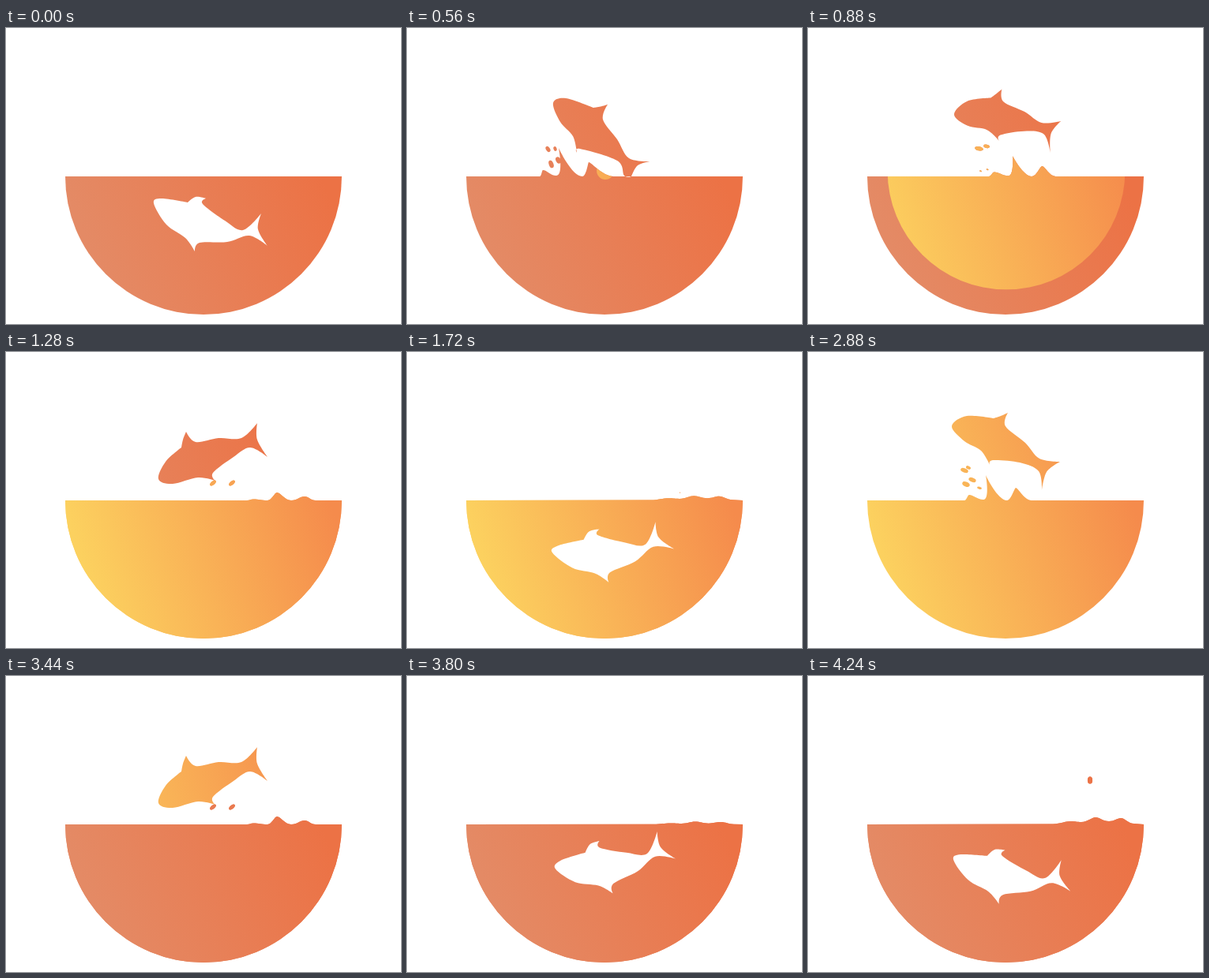
These frames come from a looping animation (500x375 px, 4280 ms). An HTML page:

```html
<!DOCTYPE html>
<html lang="en">
<head>
<meta charset="utf-8">
<title>Leaping fish</title>
<style>
  html, body { margin: 0; width: 100%; height: 100%; overflow: hidden; background: #fff; }
  svg { display: block; width: 100%; height: 100%; }
</style>
</head>
<body>
<svg viewBox="0 0 500 375">
  <defs>
    <linearGradient id="coral" gradientUnits="userSpaceOnUse" x1="120" y1="310" x2="400" y2="190">
      <stop offset="0" stop-color="#e48a65"/><stop offset="1" stop-color="#ec7245"/>
    </linearGradient>
    <linearGradient id="amber" gradientUnits="userSpaceOnUse" x1="104" y1="290" x2="410" y2="190">
      <stop offset="0" stop-color="#fcd15f"/><stop offset="1" stop-color="#f58b4c"/>
    </linearGradient>
    <clipPath id="air"><rect width="500" height="188"/></clipPath>
    <clipPath id="deep"><rect y="188" width="500" height="187"/></clipPath>
    <clipPath id="spread"><circle id="spot" cx="251" cy="181" r="0"/></clipPath>
  </defs>
  <path id="water"/>
  <path id="tint" clip-path="url(#spread)"/>
  <path id="flying" clip-path="url(#air)"/>
  <path id="diving" clip-path="url(#deep)" fill="#fff"/>
</svg>
<script>
const LOOP = 4280, HALF = 2160, STEP = 40, LEVEL = 188;
const el = id => document.getElementById(id);
const mapXY = (pts, fn) => pts.flatMap((v, i) => i % 2 ? [] : fn(v, pts[i + 1]));
const pairs = pts => mapXY(pts, (x, y) => [[x, y]]);
const clamp01 = v => Math.min(1, Math.max(0, v));

// Fish outlines: nose, back, dorsal fin, tail, belly, pectoral fin, chin.
const swim = [187, 222, 197, 216, 230, 221, 240, 214, 253, 216, 249, 223,
  277, 244, 300, 256, 323, 235, 319, 255, 331, 276, 308, 263,
  280, 271, 245, 272, 239, 283, 227, 266, 203, 249];
const leap = [185, 95, 201, 89, 236, 101, 245, 99.5, 254, 97, 248, 116,
  266, 141, 281, 165, 308, 169, 292, 174, 284, 188, 275, 187,
  266, 168, 219, 153, 215, 158, 210, 137, 194, 119];
const soar = [182, 94, 201, 81, 235, 84, 244, 81, 253, 77, 250, 94,
  275, 115, 293, 135, 319, 139, 302, 152, 296, 175, 292, 151,
  268, 140, 234, 137, 230, 143, 219, 125, 198, 113];
const plunge = [193, 161, 202, 139, 222, 121, 224, 111, 228, 101, 240, 114,
  269, 109, 298, 109, 318, 90, 318, 111, 331, 133, 309, 121,
  288, 133, 262, 153, 265, 163, 243, 159, 211, 167];
const CORNERS = new Set([2, 4, 8, 10, 14]);

function turned(deg, dx = 0, dy = 0) {
  const c = Math.cos(deg * Math.PI / 180), s = Math.sin(deg * Math.PI / 180);
  return mapXY(swim, (x, y) => {
    const u = x - 300, v = y - 257;
    return [300 + dx + u * c - v * s, 257 + dy + u * s + v * c];
  });
}

const fishTrack = [
  [-80, turned(-5.5)], [0, swim], [80, turned(4.5)],
  [560, leap], [720, soar], [1280, plunge],
  [1680, turned(-24, 4, -20)], [1860, turned(-14, -9, -4)],
  [2080, turned(-5.5)], [2160, swim], [2240, turned(4.5)]
];

// Surface outlines: feet and peaks in turn.
const burst = [168, 188, 172, 180, 189, 187, 192, 152, 222, 188, 230, 170, 262, 188];
const crest = [198, 188, 204, 181, 222, 187, 225, 156, 252, 188, 263, 172, 283, 188];
const ripple = [305, 188, 313, 186.5, 331, 188, 343, 178, 361, 188, 378, 183, 392, 188];
const swell = [310, 187.4, 333, 184, 346, 185, 364, 179, 381, 184, 396, 180, 413, 187];
const scaled = (pts, k, dx = 0) =>
  mapXY(pts, (x, y) => [x + dx, LEVEL + (y - LEVEL) * k]);

const waveTrack = [
  [0, scaled(burst, 0)], [240, scaled(burst, 0)],
  [560, burst], [720, crest], [1280, ripple],
  [1480, scaled(ripple, .6, 30)], [1660, scaled(swell, .4)],
  [1860, scaled(swell, 1.3)], [2080, swell], [2160, scaled(swell, 0)]
];

// A drop is x, y, rx, ry, tilt; it grows from the surface and sinks back.
const gone = (x, tilt) => [x, 187, 0, 0, tilt];
function spray(a, b, landing) {
  const end = landing
    ? [[1280, [landing, 166, 4.5, 2.4, -40]], [1400, gone(landing + 12, -45)]]
    : [[940, gone(b[0] + 26, 20)]];
  return [[400, gone(a[0] + 8, a[4])], [560, a], [720, b], ...end];
}
const dropTracks = [
  spray([178.5, 153.5, 2.4, 4, -35], [198, 150, 5, 2.7, 20], 262),
  spray([187.5, 153, 2, 3, -20], [203, 146.5, 3.2, 2, 25], 286),
  spray([182.5, 172.5, 2.9, 5, -20], [208, 162, 4.8, 2.7, 20]),
  spray([191.5, 167.5, 3.1, 4.4, -25], [200, 167.5, 5, 2.9, 25]),
  [[580, gone(202, 10)], [720, [217, 172.3, 3, 1.6, 15]], [880, gone(232, 20)]],
  [[1700, gone(345, 0)], [1880, [351, 112, 3, 4.5, 0]],
   [2080, [357, 132, 3.1, 4.6, 0]], [2150, gone(359, 0)]]
];

// Smooth interpolation through unevenly spaced keys.
function sample(track, t) {
  const last = track.length - 1;
  if (t <= track[0][0]) return track[0][1];
  if (t >= track[last][0]) return track[last][1];
  const i = track.findIndex(k => k[0] > t) - 1;
  const [t0, a] = track[i], [t1, b] = track[i + 1];
  const [tp, p] = track[Math.max(0, i - 1)], [tn, n] = track[Math.min(last, i + 2)];
  const d = t1 - t0, u = (t - t0) / d, w = 1 - u;
  return a.map((v, j) => {
    const m0 = (b[j] - p[j]) / (t1 - tp) * d, m1 = (n[j] - v) / (tn - t0) * d;
    return (1 + 2 * u) * w * w * v + u * w * w * m0
         + u * u * (3 - 2 * u) * b[j] - u * u * w * m1;
  });
}

// Closed spline through the outline, sharp at the fin tips.
function fishPath(t) {
  const p = pairs(sample(fishTrack, t)), n = p.length;
  const handle = (i, sign) => {
    const a = p[(i + n - 1) % n], b = p[(i + 1) % n];
    const k = CORNERS.has(i) ? 0 : sign / 6;
    return [p[i][0] + (b[0] - a[0]) * k, p[i][1] + (b[1] - a[1]) * k];
  };
  return "M" + p[0] + p.map((_, i) => {
    const j = (i + 1) % n;
    return `C${handle(i, 1)} ${handle(j, -1)} ${p[j]}`;
  }).join("") + "Z";
}

// Feet are level and wide; tall peaks turn sharp.
function wavePath(t) {
  const p = pairs(sample(waveTrack, t)).map(([x, y]) => [Math.min(x, 425), Math.min(y, LEVEL)]);
  const reach = (i, j) => {
    const dx = Math.abs(p[j][0] - p[i][0]), dy = Math.abs(p[j][1] - p[i][1]);
    return i % 2 ? .45 * dx * (1 - clamp01((LEVEL - p[i][1]) / 24))
                 : Math.max(.45 * dx, .28 * dy);
  };
  return "L" + p[0] + p.slice(1).map((b, i) => {
    const a = p[i];
    return `C${a[0] + reach(i, i + 1)} ${a[1]} ${b[0] - reach(i + 1, i)} ${b[1]} ${b}`;
  }).join("");
}

function dropPath([x, y, rx, ry, tilt]) {
  if (rx < .3 || ry < .3) return "";
  const a = tilt * Math.PI / 180, dx = rx * Math.cos(a), dy = rx * Math.sin(a);
  const arc = `A${rx} ${ry} ${tilt} 1 1 `;
  return `M${x - dx} ${y - dy}${arc}${x + dx} ${y + dy}${arc}${x - dx} ${y - dy}Z`;
}

function waterPath(t) {
  const drops = dropTracks.map(track => dropPath(sample(track, t))).join("");
  return `M75 188${wavePath(t)}L425 188A175 175 0 0 1 75 188Z${drops}`;
}

function draw(time) {
  const second = time >= HALF, t = second ? time - HALF : time;
  const [now, next] = second ? ["amber", "coral"] : ["coral", "amber"];
  const [start, span] = second ? [725, 475] : [475, 600];
  const u = clamp01((t - start) / span);

  const water = waterPath(t), fish = fishPath(t);
  for (const id of ["water", "tint"]) el(id).setAttribute("d", water);
  for (const id of ["flying", "diving"]) el(id).setAttribute("d", fish);
  el("water").setAttribute("fill", `url(#${u < 1 ? now : next})`);
  el("tint").setAttribute("fill", `url(#${next})`);
  el("flying").setAttribute("fill", `url(#${now})`);
  el("spot").setAttribute("r", 200 * u * u * (3 - 2 * u));
}

const begin = performance.now();
function tick() {
  const time = (performance.now() - begin) % LOOP;
  draw(Math.floor(time / STEP) * STEP);
  requestAnimationFrame(tick);
}
tick();
</script>
</body>
</html>
```
